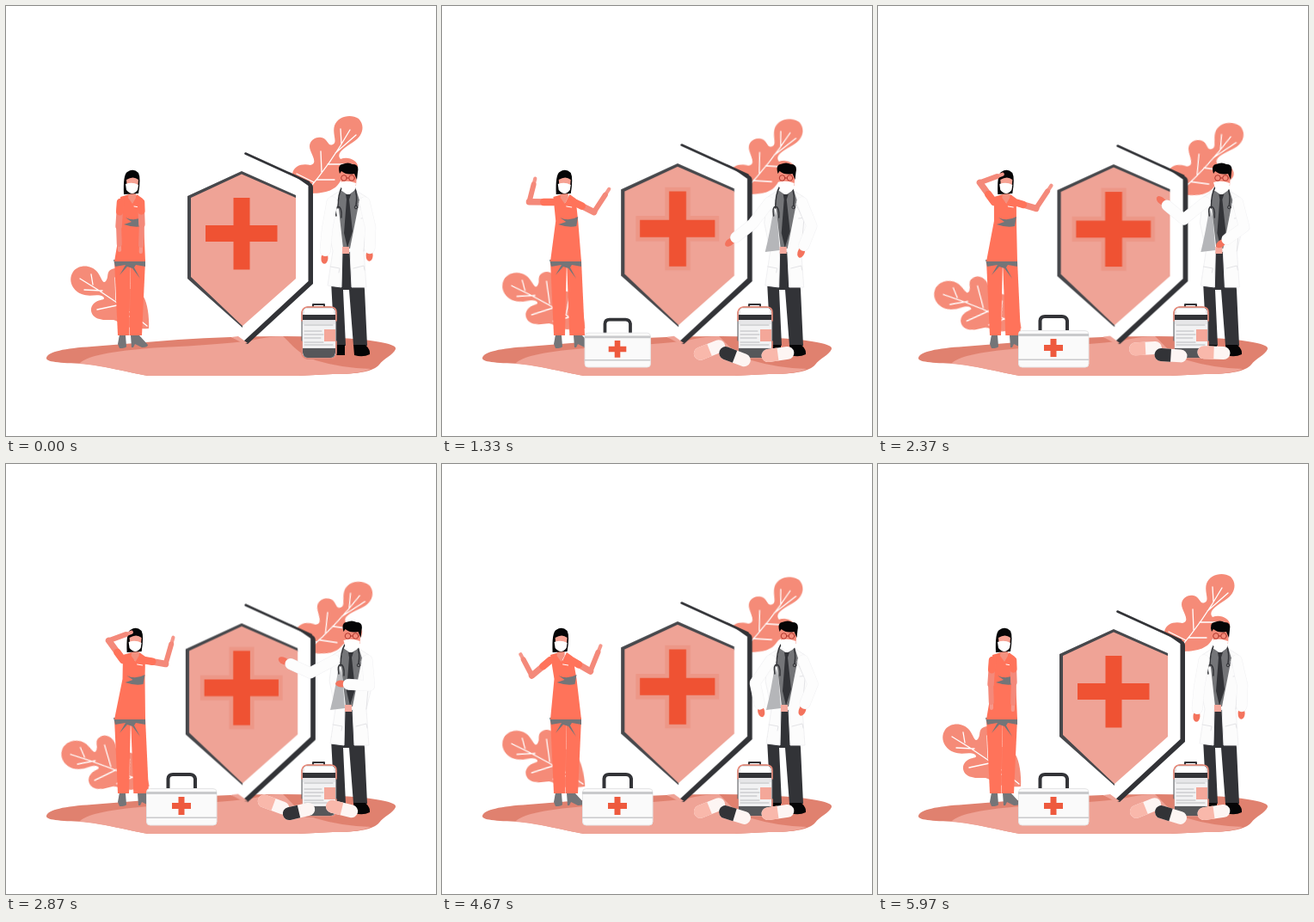
These frames come from a looping animation (500 by 500 pixels, 6 s). An HTML page:

```html
<!DOCTYPE html>
<html lang="en">
<head>
<meta charset="utf-8">
<title>Medical team and shield</title>
<style>
  html, body { margin: 0; width: 100%; height: 100%; overflow: hidden; background: #fff; }
  svg { display: block; width: 100%; height: 100%; }
  .line { fill: none; stroke-linecap: round; stroke-linejoin: round; }
  .vein { stroke: #fff; stroke-width: 1.3; }
  .dark { fill: #323337; }
  .grey { fill: #747578; }
  .scrubs { fill: #ff735a; }
  .leaf { fill: #f58b78; animation: sway 3s cubic-bezier(.364, 0, .636, 1) infinite alternate; }
  #leafR { --turn: 8.5deg; transform-origin: 345px 225px; }
  #leafL { --turn: -14deg; transform-origin: 165px 372px; }
  @keyframes sway { to { transform: rotate(var(--turn)); } }
</style>
</head>
<body>
<svg viewBox="0 0 500 500">
  <g id="leafR" class="leaf">
    <path d="M350 218C338 214 330 207 333 195C335 185 345 183 354 185C362 183 357 176 354 168C350 158 359 151 367 153C375 155 374 164 380 161C386 158 379 149 382 139C386 128 401 125 410 131C418 139 415 151 404 158C394 165 383 171 389 178C398 174 411 180 409 189C407 198 393 196 388 205C381 217 365 218 350 218Z"/>
    <path class="line vein" d="M351 214Q377 184 400 144M367 193L366 169M374 184L402 184M383 171L407 150M358 205L338 195M361 202L382 202M390 160L389 143"/>
  </g>
  <g id="leafL" class="leaf">
    <path d="M166 375C150 376 137 373 132 369C126 362 118 367 109 364C99 362 96 352 102 346C108 340 117 343 113 338C106 334 98 339 88 335C76 330 72 318 78 309C85 300 99 301 106 309C111 315 112 324 116 320C120 315 116 309 123 306C133 302 141 312 139 322C138 332 151 327 158 335C164 342 167 360 166 375Z"/>
    <path class="line vein" d="M86 317Q128 342 164 372M101 324L99 312M112 331L91 330M128 342L127 316M134 347L106 353M146 356L151 339M150 360L130 363"/>
  </g>

  <path fill="#e0816f" d="M47 409C49 402 68 398 100 396Q150 392 200 388Q260 384 325 384Q400 385 430 390C447 393 454 395 453 399C450 406 439 410 434 417C427 425 411 428 380 428L340 430H165C140 426 120 419 90 416C62 415 46 414 47 409Z"/>
  <path fill="#efa396" d="M85 416C95 405 135 400 180 397Q245 394 285 389Q306 384 322 384C333 394 339 404 360 412Q390 421 424 422Q412 428 380 428L340 430H165C140 426 120 419 85 416Z"/>

  <g id="shield">
    <path fill="#fff" d="M278 171L352 205L356 211V323L280 392L262 385L211 318V220Z"/>
    <path class="line" stroke="#323337" stroke-width="2.600" d="M278.500 171.500L352 205"/>
    <path class="dark" d="M328 192.500L353 205Q357 207 357 211V323L281 393L275 391L351.500 320V209Z"/>
    <path fill="#efa396" d="M262 385L275 392H281L270 384Z"/>
    <path fill="#47484c" d="M274 192L337 220V224L274 197L216 224V315L275 371V374L211 317V221Z"/>
    <path fill="#efa396" d="M274 195.500L337 223V317L275 372L215 315V223Z"/>
    <path id="cross" fill="#ef5233" stroke="#ec8c7a" stroke-width="9" paint-order="stroke" d="M264.500 223H283.500V255H315.500V274H283.500V306.500H264.500V274H232V255H264.500Z"/>
  </g>

  <g id="nurse">
    <path class="grey" d="M132 382L139 383L140 396Q139 398 132 398L130 393Z"/>
    <path id="shoe" class="grey" d="M145 383H155L165 394Q165 397 158 397L150 393L148 397H146Z"/>
    <path class="scrubs" d="M126 296H145L143 383H130Z"/>
    <path id="leg" class="scrubs"/>
    <path class="grey" d="M125 295H162V303L151 301L149 304L156 317L147 305L141 303L132 313L139 301L127 303Z"/>
    <path id="tunic" class="scrubs"/>
    <path id="belt" class="grey" d="M139 246Q149 251 160 245L158 256Q149 258 137 254L146 251Z"/>
    <g id="nurseHead">
      <path fill="#f4917f" d="M143 214H151V223L147 230L142 223Z"/>
      <path fill="#050506" d="M137 219Q136 196 141 193Q148 188 154 194Q157 200 154 218Z"/>
      <path fill="#f6a293" d="M140 202Q148 197 154 202L153 213Q147 220 141 213Z"/>
      <path fill="#fff" d="M139 207Q147 204 154 208L153 214Q147 222 140 214Z"/>
      <path class="line" stroke="#fff" d="M149 233L155 234"/>
    </g>
    <g id="nurseArms"></g>
  </g>

  <g id="doctor">
    <path class="dark" d="M384 286H412L417 330L420 395H404L399 330H392L395 395H382L378 320Z"/>
    <path fill="#050506" d="M382 394H394V406H384ZM404 394H418Q424 400 423 405Q415 409 405 406Z"/>
    <g id="torso">
      <path fill="#fcfcfc" stroke="#f0f0f2" d="M388 215L377 222L373 252L380 285L374 325L390 327L391 285H400L402 327H419L416 285L424 252L419 222L406 214Z"/>
      <path id="shade" fill="#b5b6b9" d="M384 234L388 246L391 284L374 286Q380 262 384 234Z"/>
      <path class="grey" d="M389 214L398 220L407 213L411 226L400 282H392L386 228Z"/>
      <path class="dark" d="M395 219H401L399 225L403 262L397 281L393 264L396 225Z"/>
      <path fill="#f5a99d" d="M391 280H399V288H391Z"/>
      <path class="line" stroke="#e3e3e6" d="M377 303L388 305L387 310M404 305L416 302L417 307M410 230L419 250L416 285M413 247L422 246"/>
      <path class="line" stroke="#323337" stroke-width="1.500" d="M391 210Q386 218 386 235M384 244Q382 234 386 233Q391 234 390 246M405 210Q409 220 407 232"/>
      <circle class="line" cx="407" cy="234" r="1.800" stroke="#323337"/>
    </g>
    <g id="docHead">
      <path fill="#f58c7b" d="M389 194Q398 190 408 195L407 209L390 207Z"/>
      <path fill="#fff" d="M388 205Q398 202 407 206L406 213Q401 219 396 218Q390 215 388 205Z"/>
      <path fill="#050506" d="M388 195Q385 185 391 184Q398 181 403 184Q411 184 409 193L408 202L405 195Q396 197 390 192Z"/>
      <g class="line" stroke="#b23a30"><circle cx="393" cy="200" r="3.300"/><circle cx="402" cy="200" r="3.300"/><path d="M396.500 200H398.500"/></g>
    </g>
    <g id="docArms"></g>
  </g>

  <g id="bottle">
    <path class="line" stroke="#323337" stroke-width="2" d="M357 350V347H370V350"/>
    <rect x="344" y="350" width="40" height="60" rx="7" fill="#e6e6e8" stroke="#55565a"/>
    <path class="line" stroke="#f08a78" stroke-width="1.500" d="M344 366V356Q345 350 351 350H377Q384 350 384 356V366M344 390V404Q345 410 351 410H377Q384 410 384 404V390"/>
    <path fill="#fff" d="M347 352H381V359H347Z"/>
    <path class="dark" d="M345 359H383V365H345Z"/>
    <path fill="#f2f2f3" d="M345 370H383V397H345Z"/>
    <path class="line" stroke="#b9babd" d="M347 371H380M347 378H367M347 382H369M347 386H366M347 391H369M347 394H380"/>
    <path fill="#f4a799" d="M370 376H383V390H370Z"/>
    <path fill="#56575a" d="M345 398H383V403Q382 409 377 409H351Q346 409 345 403Z"/>
  </g>

  <g id="pills"></g>

  <g id="kit">
    <path class="line" stroke="#323337" stroke-width="4" d="M188.500 377V366Q189 361 194 361H214Q219 361 220 366V377"/>
    <rect x="163.500" y="377.500" width="81.500" height="42.500" rx="4" fill="#fafafa" stroke="#e6e6e7"/>
    <path fill="#c9cacc" d="M163 381H245V384H163ZM163 410.500H245V412H163Z"/>
    <path fill="#ee5a3e" d="M200.500 387H207.500V394H215V401H207.500V408H200.500V401H193V394H200.500Z"/>
  </g>
</svg>
<script>
const LOOP = 6000;
const $ = id => document.getElementById(id);
const set = (el, attrs) => { for (const k in attrs) el.setAttribute(k, attrs[k]); return el; };
const make = (parent, tag, attrs) =>
  parent.appendChild(set(document.createElementNS('http://www.w3.org/2000/svg', tag), attrs));

const clamp = x => Math.max(0, Math.min(1, x));
const ramp = (t, from, to) => { const u = clamp((t - from) / (to - from)); return u * u * (3 - 2 * u); };
const plateau = (t, a, b, c, d) => ramp(t, a, b) * (1 - ramp(t, c, d));
const polar = ([x, y], degrees, r) => {
  const a = degrees * Math.PI / 180;
  return [x + r * Math.cos(a), y + r * Math.sin(a)];
};
const mix = (p, q, u) => p.map((v, i) => v + (q[i] - v) * u);
const slide = (id, x) => set($(id), { transform: `translate(${x})` });
const scaleAt = (id, x, y, s) =>
  set($(id), { transform: `translate(${x} ${y}) scale(${s}) translate(${-x} ${-y})` });
const stroke = (parent, color, width) =>
  make(parent, 'path', { class: 'line', stroke: color, 'stroke-width': width });

// Each arm takes its shoulder and the angles of both bones.
function nurseArm(upperLen, foreLen) {
  const g = $('nurseArms');
  const hand = stroke(g, '#f6978a', 4.2), fore = stroke(g, '#f4897a', 6);
  const upper = stroke(g, '#f4897a', 7.5), sleeve = stroke(g, '#ff735a', 8.5);
  return (s, upperAngle, foreAngle) => {
    const e = polar(s, upperAngle, upperLen), h = polar(e, foreAngle, foreLen);
    const wrist = mix(e, h, .75);
    set(hand, { d: `M${wrist}L${h}` });
    set(fore, { d: `M${e}L${wrist}` });
    set(upper, { d: `M${s}L${e}` });
    set(sleeve, { d: `M${s}L${mix(s, e, .4)}` });
  };
}

function docArm(upperLen, foreLen) {
  const g = $('docArms');
  const hand = make(g, 'ellipse', { rx: 6.5, ry: 4, fill: '#f4735d' });
  const edge = stroke(g, '#f1f1f3', 13), sleeve = stroke(g, '#fdfdfd', 12);
  return (s, upperAngle, foreAngle) => {
    const e = polar(s, upperAngle, upperLen), h = polar(e, foreAngle, foreLen);
    const d = `M${s}L${e}L${mix(e, h, .74)}`;
    set(edge, { d });
    set(sleeve, { d });
    set(hand, { transform: `translate(${h}) rotate(${foreAngle})` });
  };
}

// Pills roll in, then rock once together.
function pill(x, y, color, angle, spin, rock) {
  const g = make($('pills'), 'g', {});
  make(g, 'rect', { x: -19, y: -7.5, width: 38, height: 15, rx: 7.5, fill: '#fdf5f3' });
  make(g, 'path', { fill: color, d: 'M0 -7.500H-11.500A7.500 7.500 0 0 0 -11.500 7.500H0Z' });
  return (t, mid) => {
    const left = 1 - ramp(t, 500, 1400), size = ramp(t, 450, 750);
    const drop = Math.abs(spin) / 12 * left + 4 * mid;
    set(g, { transform: `translate(${x} ${y - drop}) rotate(${angle + spin * left + rock * mid}) scale(${size})` });
  };
}

const nurseL = nurseArm(28, 28), nurseR = nurseArm(26, 32);
const docL = docArm(32, 34), docR = docArm(30, 33);
const pills = [
  pill(311, 400, '#f9b8ab', -22, 20, 42),
  pill(340.5, 408, '#323337', 17, 220, -30),
  pill(390.5, 405, '#f9b8ab', -8, 18, 22)
];

function draw(t) {
  const raise = plateau(t, 0, 800, 4800, 5900);     // away from the resting pose
  const reach = plateau(t, 900, 1850, 3750, 4600);  // salute and pointing
  const mid = plateau(t, 1950, 2850, 2890, 3780);   // second beat of the gesture

  scaleAt('shield', 274, 392, 1 + .045 * raise - .011 * mid);
  set($('cross'), { 'stroke-opacity': .5 * raise });

  const lean = 8 * reach - 7 * raise + 2 * mid;
  const step = 8 * plateau(t, 0, 800, 3750, 4700);
  set($('tunic'), { d: `M${133 + lean} 222L${143 + lean} 219L${147 + lean} 229L${152 + lean} 219` +
    `L${159 + lean} 224L${160 + lean / 2} 250L162 297H126L${134 + lean / 2} 250Z` });
  slide('belt', lean / 2);
  slide('nurseHead', lean * 1.2);
  set($('leg'), { d: `M145 296H162L${158 + step} 383H${143.5 + step * .6}Z` });
  slide('shoe', step);
  nurseL([133 + lean, 228], 94 + 46 * raise + 94 * reach, 88 + 154 * raise + 98 * reach);
  nurseR([157 + lean, 228], 88 - 58 * raise - 8 * reach - 12 * mid, 92 - 160 * raise + 26 * reach - 32 * mid);

  const sway = 3 * (raise - reach + mid);
  const sweep = clamp((t - 1870) / 1860) ** 2;
  slide('torso', sway);
  slide('docHead', sway * 1.5);
  set($('shade'), { opacity: raise });
  docL([379 + sway, 228], 100 + 24 * raise + 8 * reach + 20 * mid, 95 - 17 * raise + (147 - 70 * sweep) * reach);
  docR([417 + sway, 228], 77 - 9 * raise + 17 * mid, 92 + 20 * raise + 72 * mid);

  pills.forEach(move => move(t, mid));
  scaleAt('kit', 204, 420, ramp(t, 950, 1400));
}

function frame(now) {
  draw(now % LOOP);
  requestAnimationFrame(frame);
}
draw(0);
requestAnimationFrame(frame);
</script>
</body>
</html>
```
